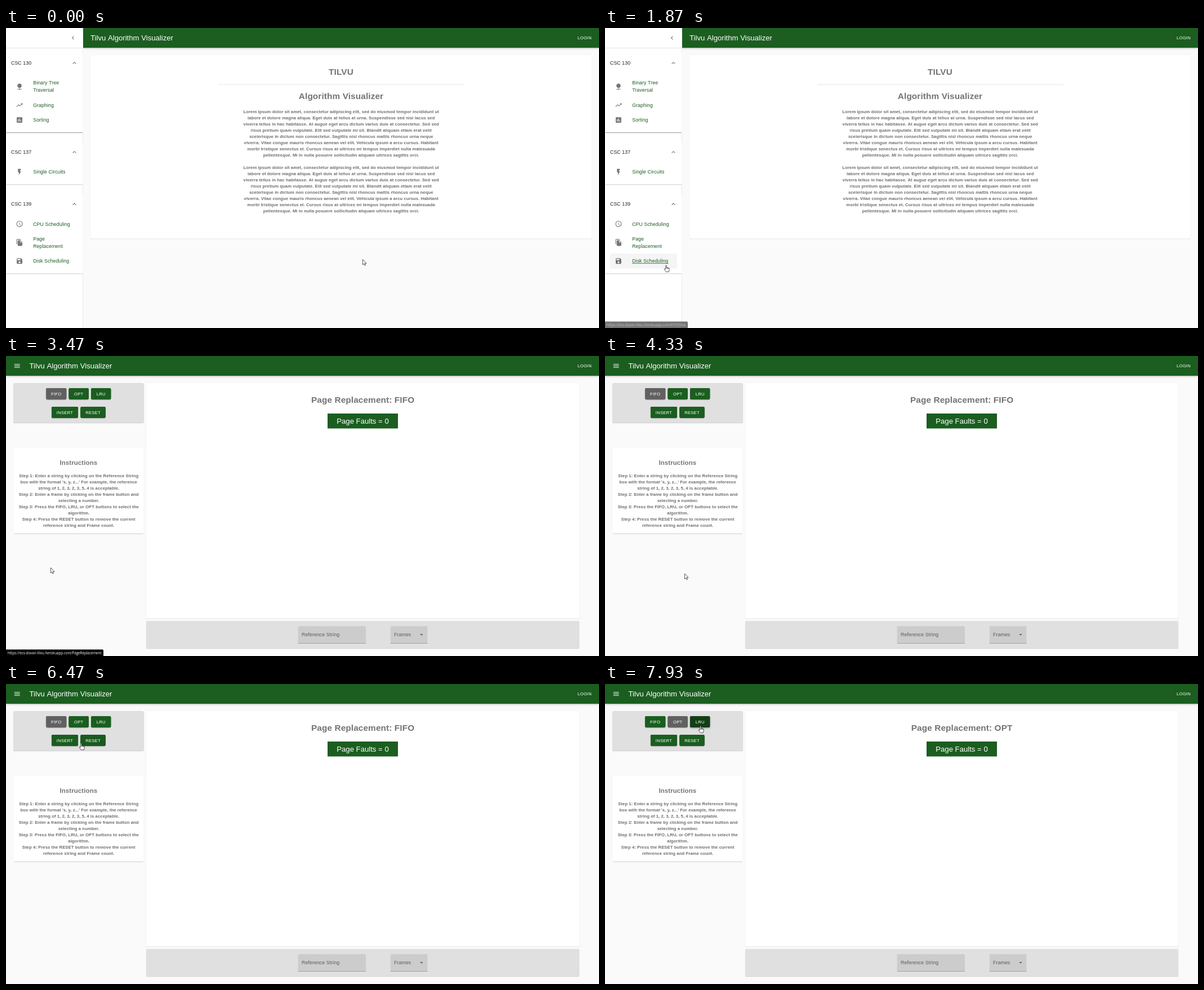
Recreate the animation shown at these times as an HTML page with a canvas. Size 1053 by 532 pixels, loop 8000 ms.

```html
<!DOCTYPE html>
<html lang="en">
<head>
<meta charset="utf-8">
<title>Page replacement walkthrough</title>
<style>
  html, body { margin: 0; width: 100%; height: 100%; overflow: hidden; background: #fafafa; }
  canvas { display: block; width: 1053px; height: 532px; }
</style>
</head>
<body>
<canvas id="stage" width="1053" height="532"></canvas>
<script>
const ctx = document.getElementById('stage').getContext('2d');
const LOOP = 8000, FPS = 15;
const U = 1053 / 1920; // stage pixels per CSS pixel of the page
const GREEN = '#1b5e20', GREEN_RGB = [27, 94, 32], DARK_RGB = [18, 62, 21];
const MUTED = 'rgba(0,0,0,.55)', INK = 'rgba(0,0,0,.87)';
const SANS = '"Liberation Sans", Arial, sans-serif';
const APP = 'Tilvu Algorithm Visualizer';
const HOST = 'https://ecs-dovan-tilvu.herokuapp.com/';
const NAV_AT = 3470, OPT_AT = 7330;

// Shadow layers: offset y, blur, spread, alpha (CSS pixels)
const LOW = [[2, 1, -1, .2], [1, 1, 0, .14], [1, 3, 0, .12]];
const MID = [[3, 1, -2, .2], [2, 2, 0, .14], [1, 5, 0, .12]];
const HIGH = [[2, 4, -1, .2], [4, 5, 0, .14], [1, 10, 0, .12]];

const ICONS = {
  less: 'M12 8l-6 6 1.4 1.4L12 10.8l4.6 4.6L18 14z',
  left: 'M15.4 7.4L14 6l-6 6 6 6 1.4-1.4L10.8 12z',
  menu: 'M3 18h18v-2H3zM3 13h18v-2H3zM3 6v2h18V6z',
  tree: 'M13 16.1a7 7 0 1 0-2 0V20H5v2h14v-2h-6z',
  trend: 'M16 6l2.3 2.3-4.9 4.9-4-4L2 16.6 3.4 18l6-6 4 4 6.3-6.3L22 12V6z',
  bars: 'M4.5 3h15L21 4.5v15L19.5 21h-15L3 19.5v-15zM7 10v7h2v-7zM11 7v10h2V7zM15 13v4h2v-4z',
  bolt: 'M7 2v11h3v9l7-12h-4l4-8z',
  clock: 'M2 12a10 10 0 1 0 20 0a10 10 0 1 0-20 0zM4 12a8 8 0 1 0 16 0a8 8 0 1 0-16 0zM11 7h1.5v5.3l4.5 2.6-.8 1.3L11 13z',
  copy: 'M16 1H4L2 3v14h2V3h12zM15 5l6 6v10l-2 2H8l-2-2V7l2-2zM14 6.5V12h5.5z',
  save: 'M17 3H5L3 5v14l2 2h14l2-2V7zM9 16a3 3 0 1 0 6 0a3 3 0 1 0-6 0zM5 5v4h10V5z',
  drop: 'M7 10l5 5 5-5z'
};

const SECTIONS = [
  { name: 'CSC 130', top: 44.6, items: [['tree', 'Binary Tree', 'Traversal'], ['trend', 'Graphing'], ['bars', 'Sorting']] },
  { name: 'CSC 137', top: 202.6, items: [['bolt', 'Single Circuits']] },
  { name: 'CSC 139', top: 294.8, items: [['clock', 'CPU Scheduling'], ['copy', 'Page', 'Replacement'], ['save', 'Disk Scheduling']] }
];

const LOREM = [
  'Lorem ipsum dolor sit amet, consectetur adipiscing elit, sed do eiusmod tempor incididunt ut',
  'labore et dolore magna aliqua. Eget duis at tellus at urna. Suspendisse sed nisi lacus sed',
  'viverra tellus in hac habitasse. At augue eget arcu dictum varius duis at consectetur. Sed sed',
  'risus pretium quam vulputate. Elit sed vulputate mi sit. Blandit aliquam etiam erat velit',
  'scelerisque in dictum non consectetur. Sagittis nisl rhoncus mattis rhoncus urna neque',
  'viverra. Vitae congue mauris rhoncus aenean vel elit. Vehicula ipsum a arcu cursus. Habitant',
  'morbi tristique senectus et. Cursus risus at ultrices mi tempus imperdiet nulla malesuada',
  'pellentesque. Mi in nulla posuere sollicitudin aliquam ultrices sagittis orci.'
];
const STEPS = [
  'Step 1: Enter a string by clicking on the Reference String',
  "box with the format 'x, y, z...' For example, the reference",
  'string of 1, 2, 3, 2, 3, 5, 4 is acceptable.',
  'Step 2: Enter a frame by clicking on the frame button and',
  'selecting a number.',
  'Step 3: Press the FIFO, LRU, or OPT buttons to select the',
  'algorithm.',
  'Step 4: Press the RESET button to remove the current',
  'reference string and Frame count.'
];

// Label, x, y, width, hover start, hover end
const BUTTONS = [
  ['FIFO', 71.3, 57.1, 35.9],
  ['OPT', 111.6, 57.1, 35.1, 6730, OPT_AT],
  ['LRU', 151.1, 57.1, 35.1, 7670, 9999],
  ['INSERT', 81, 90, 47],
  ['RESET', 132.4, 90, 44.2, 6440, 6590]
];
const BUTTON_H = 36 * U;

// Pointer path: time, x, y
const PATH = [
  [0, 633.5, 410.5], [870, 291, 427.5], [1300, 180, 431], [1730, 108.5, 420.5],
  [1870, 108.5, 420.5], [2470, 79.5, 375.5], [3600, 79.5, 375.5], [3870, 119, 411],
  [4070, 119, 411], [4330, 141.5, 386], [4930, 179, 355], [5360, 210, 285],
  [5800, 176, 202], [6470, 133.5, 105], [6670, 133, 80], [6930, 130.5, 72],
  [7400, 130.5, 72], [7930, 169.5, 74.5]
];

const clamp = v => Math.max(0, Math.min(1, v));
const inside = (p, x, y, w, h) => p.x >= x && p.x <= x + w && p.y >= y && p.y <= y + h;

// Monotone cubic through the path knots, one coordinate at a time
function along(t, axis) {
  const last = PATH.length - 1;
  if (t >= PATH[last][0]) return PATH[last][axis];
  const slope = i => (PATH[i + 1][axis] - PATH[i][axis]) / (PATH[i + 1][0] - PATH[i][0]);
  const tangent = i => {
    if (i === 0 || i === last) return 0;
    const a = slope(i - 1), b = slope(i);
    return a * b <= 0 ? 0 : 2 * a * b / (a + b);
  };
  let i = 0;
  while (t >= PATH[i + 1][0]) i++;
  const span = PATH[i + 1][0] - PATH[i][0], u = (t - PATH[i][0]) / span;
  const a = PATH[i][axis], b = PATH[i + 1][axis], v = 1 - u;
  return a * v * v * (1 + 2 * u) + b * u * u * (3 - 2 * u)
    + span * u * v * (v * tangent(i) - u * tangent(i + 1));
}

function text(str, x, y, px, { color = INK, align = 'left', bold = false, track = 0, family = SANS } = {}) {
  const size = px * U;
  ctx.font = `${bold ? 'bold ' : ''}${size}px ${family}`;
  ctx.letterSpacing = track * size + 'px';
  ctx.textAlign = align;
  ctx.fillStyle = color;
  ctx.fillText(str, x, y + size * .35);
  return ctx.measureText(str).width;
}

function rect(x, y, w, h, color, radius = 0) {
  ctx.fillStyle = color;
  ctx.beginPath();
  ctx.roundRect(x, y, w, h, radius);
  ctx.fill();
}

function paper(x, y, w, h, color, layers, radius = 4 * U) {
  for (const [dy, blur, spread, alpha] of layers) {
    ctx.save();
    ctx.shadowColor = `rgba(0,0,0,${alpha})`;
    ctx.shadowOffsetY = dy * U;
    ctx.shadowBlur = blur * U;
    const s = spread * U;
    rect(x - s, y - s, w + 2 * s, h + 2 * s, color, radius);
    ctx.restore();
  }
  rect(x, y, w, h, color, radius);
}

function icon(name, cx, cy, color = 'rgba(0,0,0,.54)') {
  ctx.save();
  ctx.translate(cx - 12 * U, cy - 12 * U);
  ctx.scale(U, U);
  ctx.fillStyle = color;
  ctx.fill(new Path2D(ICONS[name]), 'evenodd');
  ctx.restore();
}

function ripple(x, y, w, h, p, radius, color) {
  ctx.save();
  ctx.beginPath();
  ctx.rect(x, y, w, h);
  ctx.clip();
  ctx.beginPath();
  ctx.arc(p.x, p.y, radius, 0, 7);
  ctx.fillStyle = color;
  ctx.fill();
  ctx.restore();
}

const heading = (str, x, y, px = 28) => text(str, x, y, px, { bold: true, align: 'center', color: MUTED, track: .0075 });
const paragraph = (lines, x, y) => lines.forEach((line, i) =>
  text(line, x, y + i * 20.02 * U, 14, { bold: true, align: 'center', color: 'rgba(0,0,0,.58)', track: .01071 }));
const body = (str, x, y, color) => text(str, x, y, 16, { color, track: .00938 });
const label = (str, x, y) => text(str, x, y, 14, { color: '#fff', align: 'center', track: .02857 });

function appBar(x, titleX) {
  paper(x, 0, 1053 - x, 64 * U, GREEN, HIGH, 0);
  text(APP, titleX, 17.5, 24, { color: '#fff' });
  label('LOGIN', 1027.5, 17.6);
}

// Draws the side menu and returns whether a link is under the pointer
function sideMenu(t, p) {
  let over = false;
  rect(0, 0, 137, 532, '#fff');
  rect(136.4, 0, .6, 532, 'rgba(0,0,0,.14)');
  rect(0, 35.1, 136.4, .6, 'rgba(0,0,0,.14)');
  icon('left', 119, 17.5);
  for (const { name, top, items } of SECTIONS) {
    const rows = items.map(item => (24 * item.length - (item.length > 2 ? 0 : 0)) * U);
    const height = 39.5 + rows.reduce((a, b) => a + b, 0) + 8.8;
    paper(0, top, 136.4, height, '#fff', LOW, 0);
    body(name, 9, top + 17.5, INK);
    icon('less', 121.5, top + 17.5);
    let y = top + 39.5;
    items.forEach(([glyph, ...lines], i) => {
      const h = rows[i], mid = y + h / 2;
      const hover = inside(p, 9, y, 119, h);
      if (hover) {
        over = true;
        rect(8.8, y, 119.2, h, '#f5f5f5');
      }
      icon(glyph, 24, mid);
      lines.forEach((line, k) => {
        const ly = mid + (k - (lines.length - 1) / 2) * 24 * U;
        const w = body(line, 48.2, ly, GREEN);
        if (hover) rect(48.2, ly + 4, w, .7, GREEN);
      });
      if (hover && t >= 3260) ripple(8.8, y, 119.2, h, p, 20.5 * ((t - 3250) / 150) ** 1.5, 'rgba(27,94,32,.16)');
      y += h;
    });
  }
  return over;
}

function homePage(t, p) {
  appBar(137, 150);
  paper(150.2, 48.3, 889.6, 325.2, '#fff', LOW);
  heading('TILVU', 595, 78);
  rect(377.5, 99.7, 436, .8, '#dcdcdc');
  heading('Algorithm Visualizer', 595, 121);
  paragraph([...LOREM, '', ...LOREM], 595.2, 148.4);
  return sideMenu(t, p);
}

function button([name, x, y, w, start, end], t, selected) {
  const hover = start ? clamp((t - start) / 250) - clamp((t - end) / 250) : 0;
  const mix = GREEN_RGB.map((c, i) => Math.round(c + (DARK_RGB[i] - c) * hover));
  paper(x, y, w, BUTTON_H, selected ? '#616161' : `rgb(${mix})`, hover > .5 ? HIGH : MID);
  if (name === 'OPT' && t >= 7200 && t < 7600) {
    const alpha = .3 * (1 - clamp((t - OPT_AT) / 270));
    ripple(x, y, w, BUTTON_H, { x: 130.5, y: 72 }, (t - 7180) * .12, `rgba(255,255,255,${alpha})`);
  }
  label(name, x + w / 2, y + BUTTON_H / 2);
}

function field(str, x, w) {
  rect(x, 478.9, w, 30.7, '#ccc', [2.2, 2.2, 0, 0]);
  rect(x, 508.9, w, .7, 'rgba(0,0,0,.5)');
  body(str, x + 6.4, 494, MUTED);
}

function replacementPage(t, p) {
  const mode = t < OPT_AT ? 'FIFO' : 'OPT';
  appBar(0, 41.5);
  icon('menu', 19.7, 17.5, '#fff');
  paper(13.2, 48.3, 231.3, 70.2, '#e0e0e0', LOW);
  for (const b of BUTTONS) button(b, t, b[0] === mode);
  paper(13.2, 163, 231.3, 151.6, '#fff', LOW);
  heading('Instructions', 128.8, 189, 21);
  paragraph(STEPS, 129.2, 212.6);
  paper(249, 48.3, 769, 417.2, '#fff', LOW);
  heading('Page Replacement: ' + mode, 633.6, 78);
  rect(571, 102, 125, 26.5, GREEN);
  text('Page Faults = 0', 633.5, 115.2, 24, { color: '#fff', align: 'center' });
  paper(249, 470.2, 769, 48.2, '#e0e0e0', LOW);
  field('Reference String', 518.7, 120.3);
  field('Frames', 682.7, 65.8);
  icon('drop', 738, 494);
  return BUTTONS.some(([, x, y, w]) => inside(p, x, y, w, BUTTON_H));
}

function statusBar(t, p) {
  const alpha = clamp((t - 1800) / 130) - clamp((t - 3600) / 200);
  if (alpha <= 0) return;
  const page = t < NAV_AT && p.y > 400.2 ? 'FCFSDisk' : 'PageReplacement';
  const family = '"Open Sans", "Noto Sans", sans-serif', px = 6.23 / U;
  ctx.save();
  ctx.globalAlpha = alpha;
  ctx.font = `6.23px ${family}`;
  ctx.letterSpacing = '0px';
  rect(0, 520.4, ctx.measureText(HOST + page).width + 6.5, 12, '#000', [0, 2, 0, 0]);
  text(HOST + page, 3, 526.4, px, { color: '#fff', family });
  ctx.restore();
}

const ARROW = new Path2D('M0 0V9.3L2.1 7.4 3.6 10.6 5 10 3.6 6.8H6.6Z');
const HAND = new Path2D('M-.9.8Q0-.6.9.8V4.1L4.4 4.9Q6 5.3 5.8 7.2L5 11.8H-.2L-3.2 7.8Q-3.7 6.1-2.2 6.4L-.9 7.4Z');
const KNUCKLES = new Path2D('M.9 4V6.2M2.6 4.6V6.4M4.2 5V6.6');
const IBEAM = new Path2D('M-1.8-4.4H1.8M0-4.4V4.4M-1.8 4.4H1.8');

function pointer(p, hand) {
  const beam = p.y > 207 && p.y < 306 && p.x < 236;
  ctx.save();
  ctx.translate(p.x, p.y);
  ctx.fillStyle = '#fff';
  ctx.strokeStyle = '#000';
  ctx.lineWidth = .65;
  if (beam) {
    ctx.stroke(IBEAM);
  } else {
    const shape = hand ? HAND : ARROW;
    ctx.fill(shape);
    ctx.stroke(shape);
    if (hand) ctx.stroke(KNUCKLES);
  }
  ctx.restore();
}

function draw(t) {
  const p = { x: along(t, 1), y: along(t, 2) };
  rect(0, 0, 1053, 532, '#fafafa');
  const home = t < NAV_AT - 5;
  const over = home ? homePage(t, p) : replacementPage(t, p);
  statusBar(t, p);
  pointer(p, over && !(home && t > 3390));
}

function tick(now) {
  const step = Math.floor((now % LOOP + 4) * FPS / 1000);
  draw(Math.round(step * 100 / FPS) * 10);
  requestAnimationFrame(tick);
}
requestAnimationFrame(tick);
</script>
</body>
</html>
```
